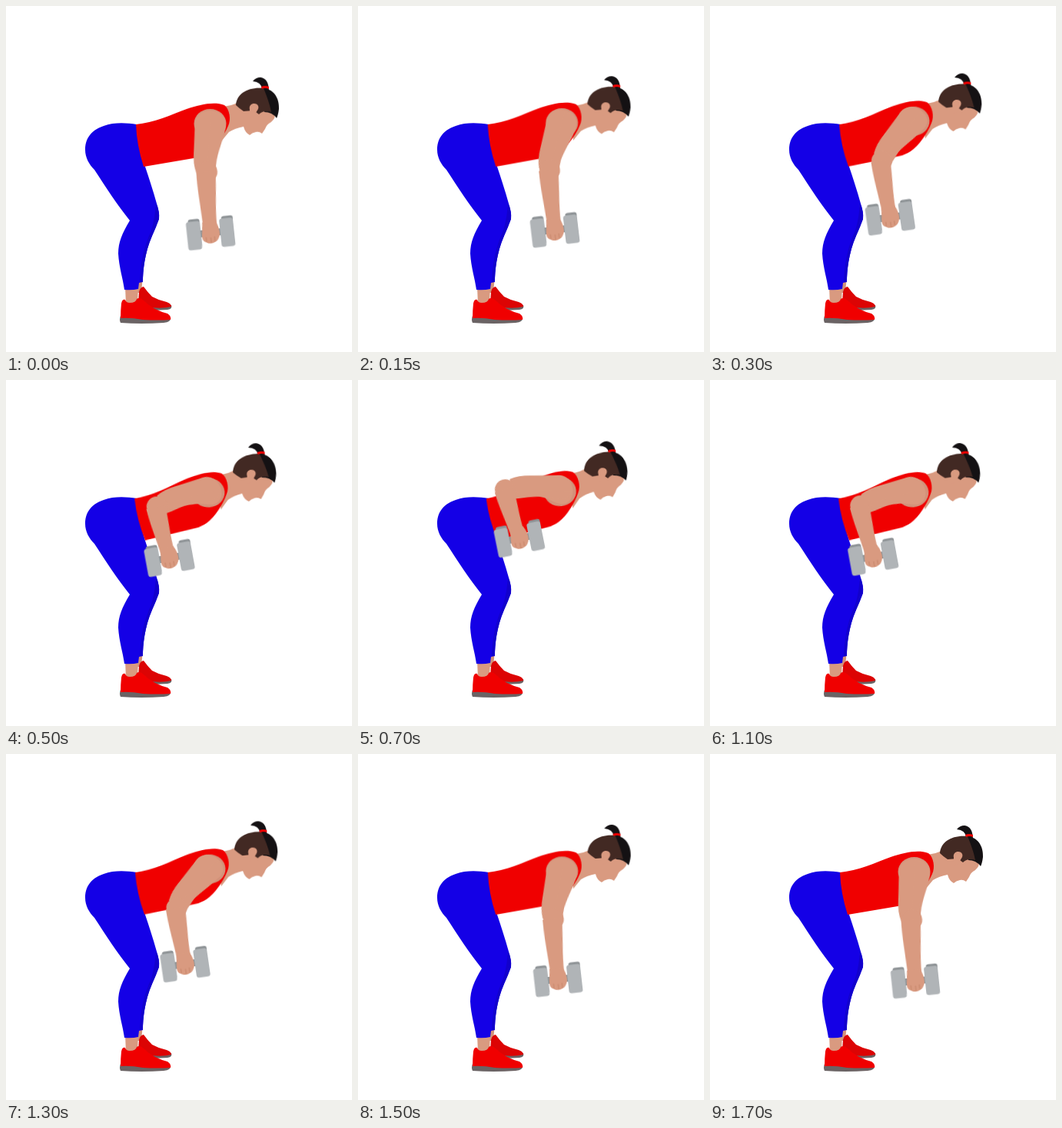
An HTML page that plays this animation: 450x450 px, repeating every 1.75 s.

```html
<!DOCTYPE html>
<html lang="en">
<head>
<meta charset="utf-8">
<title>Bent-over dumbbell row</title>
<style>
  html, body { margin: 0; width: 100%; height: 100%; overflow: hidden; background: #fff; }
  svg { display: block; width: 100%; height: 100%; }

  .move {
    transform-box: view-box;
    transform-origin: 0 0;
    animation: 875ms cubic-bezier(.45, 0, .5, 1) -70ms infinite alternate both;
  }
  .torso { transform-origin: 172px 180px; animation-name: lean; }
  .upper { animation-name: raise; }
  .triceps { animation-name: slim; }
  .elbow { animation-name: bend; }
  .forearm { animation-name: shorten; }
  .wrist { animation-name: grip; }

  @keyframes lean { from { transform: rotate(0deg); } to { transform: rotate(-5deg); } }
  @keyframes raise {
    from { transform: translate(266px, 152px) rotate(3deg); }
    to { transform: translate(266px, 152px) rotate(98deg); }
  }
  @keyframes slim { from { transform: scale(1, 1); } to { transform: scale(.5, 1); } }
  @keyframes bend {
    from { transform: translate(0, 64px) rotate(-6deg); }
    to { transform: translate(0, 72px) rotate(-109deg); }
  }
  @keyframes shorten { from { transform: scale(1, 1); } to { transform: scale(1, .83); } }
  @keyframes grip {
    from { transform: translate(0, 81px) rotate(-3deg); }
    to { transform: translate(0, 67px) rotate(4.5deg); }
  }

  .skin { fill: #d99a80; }
  .shade { fill: #d2927a; }
  .red { fill: #f00000; }
  .dark-red { fill: #dc0404; }
  .blue { fill: #1400e6; }
  .dark-blue { fill: #1200cc; }
  .sole { fill: #6a6364; }
  .black { fill: #141113; }
  .brown { fill: #422923; }
  .metal { fill: #b0b4b7; }
  .steel { fill: #8d9295; }
  .crease { fill: none; stroke: #c58469; stroke-width: 1; stroke-linecap: round; }
</style>
</head>
<body>
<svg viewBox="0 0 450 450">
  <defs>
    <g id="weight">
      <rect class="steel" x="-6" y="-21.5" width="15" height="37" rx="3"/>
      <rect class="metal" x="-9" y="-18.5" width="18" height="37" rx="3.5"/>
    </g>
  </defs>

  <!-- far leg -->
  <path class="shade" d="M171 356H177.500L176 373H171Z"/>
  <path class="sole" d="M180 391L215 389Q217 394 210 395L190 396Z"/>
  <path class="dark-red" d="M173 372Q174 366 179 365Q184 372 190 378Q199 383 209 385Q215 387 215 391Q204 394 188 392L172 386Z"/>

  <!-- near foot -->
  <path class="skin" d="M155 365H172L171 388H156Z"/>
  <path class="sole" d="M149 403L214 405Q215 411 205 412Q176 414 149 412Q147 408 149 403Z"/>
  <path class="red" d="M150 387Q151 381 155 382Q156 386 161 386Q169 386 170 381Q174 378 179 383Q186 390 194 394Q202 398 210 400Q215 403 214 408Q198 409 178 408Q162 405 149 406Q149 396 150 387Z"/>

  <!-- leggings -->
  <path class="blue" d="M170 154C157 152 140 151 127 156C109 162 103 174 103 187C103 197 108 206 115 213C130 236 145 259 161 279C151 296 146 307 146 322C147 340 152 354 154 369Q164 370 172 368L173 360L178 359C178 345 180 322 190 299Q195 288 199 277Q200 268 196 257C191 239 186 224 181 209Q173 181 170 154Z"/>
  <path class="dark-blue" d="M199 277Q195 288 190 299C180 322 178 345 178 359H174C175 338 178 318 186 299Q193 285 195 256Q200 268 199 277Z"/>

  <g class="move torso">
    <!-- neck and face -->
    <path class="skin" d="M278 131Q294 131 304 124L343 122L350 139Q351 146 345 151Q339 154 337 160L333 166Q329 163 325 164Q320 165 317 168Q311 165 309 157Q298 159 290 164L280 176Z"/>
    <!-- hair -->
    <path class="black" d="M333 108Q332 99 321 98Q325 93 331 93Q341 94 342 109Z"/>
    <path class="black" d="M331 107C347 106 356 119 355 134Q354 142 352 146Q346 138 336 138Z"/>
    <path class="brown" d="M299 129C300 114 315 105 335 107C339 117 343 127 345 138Q335 135 329 141L322 136L309 137Q303 133 299 129Z"/>
    <path class="red" d="M332 105Q337 103 342 105V108Q337 106 333 108Z"/>
    <path class="skin" d="M317 135C315 126 326 125 328 130C330 135 324 137 325 142L317 145Z"/>

    <!-- top -->
    <path class="red" d="M169 154C192 152 216 141 235 134C252 128.500 270 124 284 129C291 134 293 148 289 156Q284 168 273 181Q265 190 257 194Q251 197 244 198L179 209Q170 181 169 154Z"/>
    <ellipse class="shade" cx="265.500" cy="153" rx="21" ry="19"/>

    <!-- arm -->
    <g class="move upper">
      <path class="skin" d="M-20 6C-22 -9 -10 -16 0 -16C12 -16 18 -9 17 0C14 12 8 20 8 28Q9 42 11 54L12 66L-14 66Q-19 55 -19 40Z"/>
      <path class="skin move triceps" d="M0 -14C14 -15 22 -7 20 7C18 22 12 36 11 54L0 60Z"/>
      <g class="move elbow">
        <circle class="skin" r="13.500"/>
        <path class="skin move forearm" d="M-14 0C-14 22 -11 42 -9 70L9 70C8 46 11 25 11 0Z"/>
        <g class="move wrist">
          <rect class="steel" x="-20" y="-6" width="40" height="9"/>
          <use href="#weight" x="-21.500"/>
          <use href="#weight" x="22"/>
          <path class="skin" d="M-9 -16H8Q13 -7 12 2Q10 9 5 11Q-2 14 -7 10Q-12 8 -11 0Z"/>
          <path class="crease" d="M-6 4V9M0 5V11M5 4V9"/>
        </g>
      </g>
    </g>
  </g>
</svg>
</body>
</html>
```
